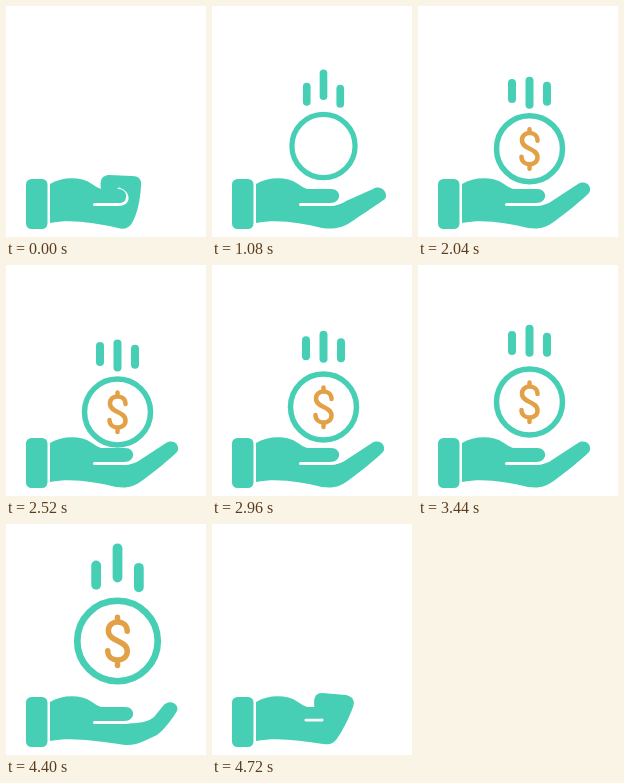
An HTML page for the animation above (4.8 s loop, 200 by 231 pixels).

```html
<!DOCTYPE html>
<html lang="en">
<head>
<meta charset="utf-8">
<title>Coin in hand</title>
<style>
  html, body { margin: 0; width: 100%; height: 100%; overflow: hidden; background: #fff; }
  svg { display: block; width: 100%; height: 100%; }
  .fill { fill: #46cfb5; }
  .line { fill: none; stroke: #46cfb5; stroke-linecap: round; }
  #crease { fill: none; stroke: #fff; stroke-width: 3; stroke-linecap: round; }
  #dollar { fill: none; stroke: #e2a146; stroke-width: 4.5; stroke-linecap: round; }
</style>
</head>
<body>
<svg viewBox="0 0 200 231">
  <g id="coin">
    <circle class="line" r="33" stroke-width="5.5"/>
    <g class="line" stroke-width="8">
      <path class="bar" d="M-17.5 4v16"/>
      <path class="bar" d="M0 4v24"/>
      <path class="bar" d="M17.5 4v16"/>
    </g>
    <path id="dollar" d="M0 -19.5V-16M8 -8C8 -18 -7.5 -18 -7.5 -8.5C-7.5 1 8 -1 8 8.5C8 18 -8 18 -8 8M0 16V20"/>
  </g>
  <rect class="fill" x="20" y="173" width="21.5" height="50" rx="5.5"/>
  <path class="fill" id="hand"/>
  <path id="crease"/>
  <path class="fill" id="thumb"/>
</svg>
<script>
const LOOP = 4800, STEP = 40;
const $ = id => document.getElementById(id);
const bars = document.querySelectorAll('.bar');

// Finger outlines: shut, curled, cupped, open, wide
const poses = [
  'L96 190C96 184 90 170 103 169L126 170C134 170 136 175 135 180C134 196 131 208 126 217C123 222 118 224 112 222',
  'L102 190C104 182 98 170 110 169L134 171C142 173 143 178 141 183C137 194 131 206 126 213C122 220 117 221 111 220',
  'L118 199C126 200 142 199 148 193L157 182C163 174 174 180 171 187C167 194 158 206 151 211C140 216 130 222 119 221',
  'L118 199C124 200 130 198 134 195L160 178C168 173 175 181 171 187C164 194 148 207 137 215C126 223 120 223 110 222',
  'L118 199C124 200 130 198 134 195L161 183C169 178 177 187 173 193C166 198 145 212 136 218C126 223 120 223 110 222'
];
const nums = poses.map(p => p.match(/\d+/g).map(Number));

const mix = (a, b, p) => a + (b - a) * p;

// Eased value at time t from [time, value] pairs
function track(t, keys) {
  if (t <= keys[0][0]) return keys[0][1];
  for (let i = 1; i < keys.length; i++) {
    const [t0, a] = keys[i - 1], [t1, b] = keys[i];
    if (t < t1) return mix(a, b, (1 - Math.cos(Math.PI * (t - t0) / (t1 - t0))) / 2);
  }
  return keys[keys.length - 1][1];
}

const grip = [[680, 0], [800, 1], [900, 2], [1080, 4], [1300, 3], [4040, 3], [4240, 4], [4320, 3], [4400, 2], [4720, 1]];
const size = [[680, 0], [880, 1.15], [1080, .957], [1240, 1], [4040, 1], [4280, 1.3], [4400, 1.22], [4560, 0]];
const height = [[680, 185], [880, 127], [1080, 140], [1240, 142], [4040, 142], [4280, 107], [4400, 117], [4560, 185]];
const hover = [[1080, 0], [1240, 1], [4000, 1], [4120, 0]];
const sign = [[1120, 0], [1320, 1.1], [1440, 1]];

function drawHand(t) {
  const k = track(t, grip), i = Math.min(3, Math.floor(k));
  let n = 0;
  const fingers = poses[0].replace(/\d+/g, () => {
    const v = mix(nums[i][n], nums[i + 1][n], k - i);
    n++;
    return v.toFixed(2);
  });
  $('hand').setAttribute('d', `M44 178C56 171 74 170 86 178C89 180 92 182 95 183${fingers}C88 217 66 213 44 217Z`);

  const r = Math.min(1, Math.abs(k - 1));
  const e = k < 1 ? mix(112, 110, k) : mix(110, 119, r);
  const y = mix(196, 198.5, r), x = mix(94, 88.5, r);
  $('crease').setAttribute('d', `M${x} ${y}H${e}C${e + 13 * r} ${y} ${e + 11 * r} ${y - 11.5 * r} ${e + r} ${y - 15.5 * r}`);
  $('thumb').setAttribute('d', `M86 183H${e}C${e + 11 * r} 183 ${e + 11 * r} ${y - 1.5} ${e - 1} ${y - 1.5}H86Z`);
}

function drawCoin(t) {
  const w = track(t, hover), s = track(t, size);
  const y = track(t, height) + 5 * w * Math.sin(2 * Math.PI * (t - 2000) / 1920);
  $('coin').setAttribute('transform', `translate(111.5 ${y}) scale(${s})`);
  $('coin').setAttribute('visibility', s > .01 ? 'visible' : 'hidden');
  $('dollar').setAttribute('transform', `scale(${track(t, sign)})`);
  $('dollar').setAttribute('visibility', t > 1120 ? 'inherit' : 'hidden');

  const wave = Math.sin(2 * Math.PI * (t - 2949) / 495);
  [[-66, -5, 1.5], [-80, 3, 6], [-64, -5, 2.5]].forEach(([top, shift, amp], i) =>
    bars[i].setAttribute('transform', `translate(0 ${top + w * (shift + amp * wave)})`));
}

function draw(now) {
  const t = Math.floor(now % LOOP / STEP) * STEP;
  drawHand(t);
  drawCoin(t);
}

const start = performance.now();
function tick(now) {
  draw(Math.max(0, now - start));
  requestAnimationFrame(tick);
}
draw(0);
requestAnimationFrame(tick);
</script>
</body>
</html>
```
